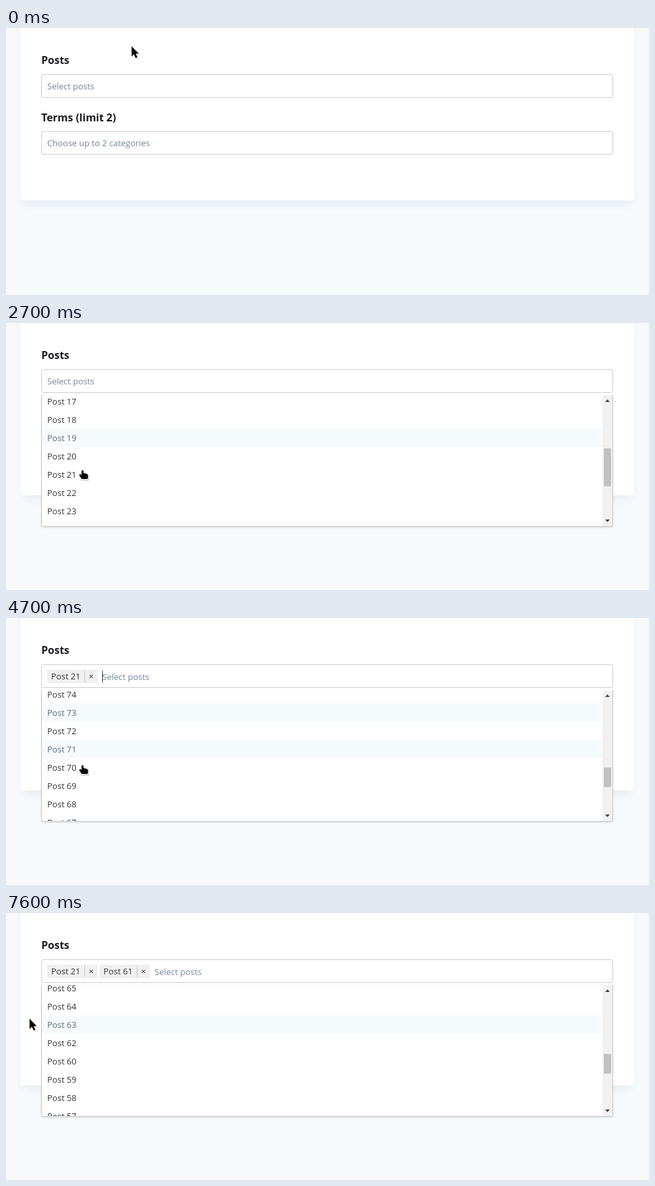
An HTML page for the animation above (8000 ms loop, 983x409 px).

```html
<!DOCTYPE html>
<html lang="en">
<head>
<meta charset="utf-8">
<title>Post selector</title>
<style>
  html, body { margin: 0; width: 100%; height: 100%; overflow: hidden; background: #f6fafd; }
  body { position: relative; font: 13px/18px "Open Sans", sans-serif; color: #333; }
  body *, body svg { position: absolute; box-sizing: border-box; white-space: nowrap; }
  .card { left: 22px; top: -20px; width: 938px; height: 284px; background: #fff; border-radius: 4px;
          box-shadow: 0 10px 15px -6px rgba(40, 60, 80, .09); }
  .label { left: 54px; font: bold 16px/22px "Open Sans", sans-serif; color: #191922; }
  .field { left: 54px; width: 874px; height: 36px; border: 1px solid #ccc; border-radius: 3px; background: #fff; }
  .hint { left: 63px; color: #71859a; }
  .tag { top: 79px; width: 77px; height: 21px; padding-left: 6px; line-height: 20px; background: #f0f0f0; }
  .tag i { left: 57px; top: 2px; width: 1px; height: 17px; background: #c4c4c4; }
  .tag b { left: 63.5px; font-weight: 400; }
  #caret { top: 81px; width: 1px; height: 18px; background: #333; }
  #menu { left: 54px; top: 110px; width: 874px; height: 202px; background: #fff; border: 1px solid #ccc;
          border-top: 0; border-radius: 0 0 3px 3px; box-shadow: 0 1px 3px rgba(0, 0, 0, .16); }
  #list { left: 0; top: 1px; width: 857px; height: 200px; overflow: hidden; }
  .row { left: 0; width: 100%; height: 28px; padding-left: 8px; line-height: 28px; }
  .row.hot { background: #f5fafd; color: #5a6875; }
  #bar { left: 857px; top: 1px; width: 15px; height: 200px; background: #f1f1f1; }
  #thumb { left: 2px; width: 11px; background: #c1c1c1; }
  #bar svg { left: 0; top: 0; }
  #cursors { left: 0; top: 0; overflow: visible; }
</style>
</head>
<body>
<div class="card"></div>
<div class="label" style="top:38px">Posts</div>
<div class="field" style="top:71px"></div>
<div id="tags"></div>
<div class="hint" id="hint">Select posts</div>
<div id="caret"></div>
<div class="label" style="top:126px">Terms (limit 2)</div>
<div class="field" style="top:158px"></div>
<div class="hint" style="top:167px">Choose up to 2 categories</div>
<div id="menu">
  <div id="list"></div>
  <div id="bar">
    <div id="thumb"></div>
    <svg width="15" height="200">
      <path id="up" d="M4 10 7.5 6 11 10Z"/>
      <path id="down" d="M4 190 7.5 194 11 190Z"/>
    </svg>
  </div>
</div>
<svg id="cursors" width="1" height="1" stroke-linejoin="round">
  <g id="arrow">
    <path d="M1 2V17L5 14 8 20 11 19 8.500 13H13Z" fill="#000" opacity=".15"/>
    <path d="M0 0V15.500L3.600 12.200 6.200 18 8.900 16.800 6.300 11.200H11Z" stroke="#fff" paint-order="stroke" stroke-width="1.500"/>
  </g>
  <path id="beam" d="M-3 -8.500H3M-3 8.500H3M.5 -8.500V8.500" stroke="#222" fill="none"/>
  <g id="hand">
    <path d="M1 2 8 7 9.500 9V16H-2L-5 9Z" fill="#000" stroke="#000" opacity=".2"/>
    <path d="M0 .5Q1.500 .5 1.500 2V5L6.500 6Q8.500 6.500 8.500 8.500V11L7.500 14H-1L-5 8.500Q-5 6 -3 6.500L-1.500 8V2Q-1.500 .5 0 .5Z"
          stroke="#fff" paint-order="stroke" stroke-width="2"/>
  </g>
</svg>
<script>
const $ = id => document.getElementById(id);
const LOOP = 8000, TICK = 100, ROW = 28, VIEW = 200, LIST_TOP = 111, TRACK = 170, BUTTON = 15;
const OPEN = 900, PICKS = [[3300, 21], [6900, 61]];

// Key poses: time followed by values, linear in between
const SCROLL = [[2000, 0], [2700, 229], [3700, 229], [4050, 360], [4300, 360], [5000, 920], [5400, 920], [5900, 934]];
const POINTER = [[0, 192, 28], [500, 139, 89], [1400, 139, 89], [1500, 134, 141], [1800, 117, 231], [2000, 117, 231],
  [2100, 117, 225], [7200, 117, 225], [7500, 70, 170], [7600, 36, 162]];

function pose(keys, t) {
  const next = keys.findIndex(key => key[0] > t);
  if (next < 0) return keys[keys.length - 1].slice(1);
  if (next === 0) return keys[0].slice(1);
  const from = keys[next - 1], to = keys[next];
  const part = (t - from[0]) / (to[0] - from[0]);
  return from.slice(1).map((v, i) => v + (to[i + 1] - v) * part);
}

const range = (from, count, step) => Array.from({ length: count }, (_, i) => 'Post ' + (from + i * step));

function rowsAt(t, picked) {
  const rows = ['Post', ...range(10, 19, 1)];
  if (t >= 4300) rows.push(...range(79, 20, -1));
  if (t >= 5500) rows.push(...range(59, 20, -1));
  return rows.filter(name => !picked.includes(name)).concat('Loading more results ...');
}

function hovered(t) {
  const y = pose(POINTER, t)[1] + 4, [scroll] = pose(SCROLL, t);
  return Math.max(0, Math.floor((y - LIST_TOP + scroll) / ROW));
}

function drawMenu(t, picked) {
  $('menu').style.display = t >= OPEN ? '' : 'none';
  const rows = rowsAt(t, picked), height = rows.length * ROW;
  const scroll = Math.round(pose(SCROLL, t)[0]);
  // The highlight trails the pointer and rests until the mouse moves again
  const times = t >= 2500 && t < 3100 ? [2500] : [t - 100, t - 50];
  const hot = t > OPEN ? times.map(hovered) : [];
  $('list').innerHTML = rows.map((name, i) =>
    `<div class="row${hot.includes(i) ? ' hot' : ''}" style="top:${i * ROW - scroll}px">${name}</div>`).join('');

  const end = height - VIEW, size = Math.max(30, TRACK * VIEW / height);
  $('thumb').style.height = Math.round(size) + 'px';
  $('thumb').style.top = Math.round(BUTTON + (TRACK - size) * scroll / end) + 'px';
  $('up').setAttribute('fill', scroll > 0 ? '#404040' : '#a3a3a3');
  $('down').setAttribute('fill', scroll < end ? '#404040' : '#a3a3a3');
}

function drawField(t, picked) {
  $('tags').innerHTML = picked.map((name, i) =>
    `<div class="tag" style="left:${63 + 80 * i}px">${name}<i></i><b>×</b></div>`).join('');
  const left = picked.length ? 67 + 80 * picked.length : 63;
  $('hint').style.left = $('caret').style.left = left + 'px';
  $('hint').style.top = picked.length ? '81px' : '80px';
  const lit = t >= OPEN && Math.floor((t - OPEN) / 600) % 2 === 0;
  $('caret').style.display = lit ? '' : 'none';
}

function drawPointer(t) {
  const [x, y] = pose(POINTER, t).map(Math.round);
  const shape = x < 54 || y < 71 ? 'arrow' : y < 107 ? 'beam' : 'hand';
  for (const id of ['arrow', 'beam', 'hand']) $(id).style.display = id === shape ? '' : 'none';
  $(shape).setAttribute('transform', `translate(${x} ${y})`);
}

let shown = -1;
function frame(now) {
  const t = Math.floor(now % LOOP / TICK) * TICK;
  if (t !== shown) {
    shown = t;
    const picked = PICKS.filter(([time]) => t >= time).map(([, n]) => 'Post ' + n);
    drawField(t, picked);
    drawMenu(t, picked);
    drawPointer(t);
  }
  requestAnimationFrame(frame);
}
frame(0);
</script>
</body>
</html>
```
